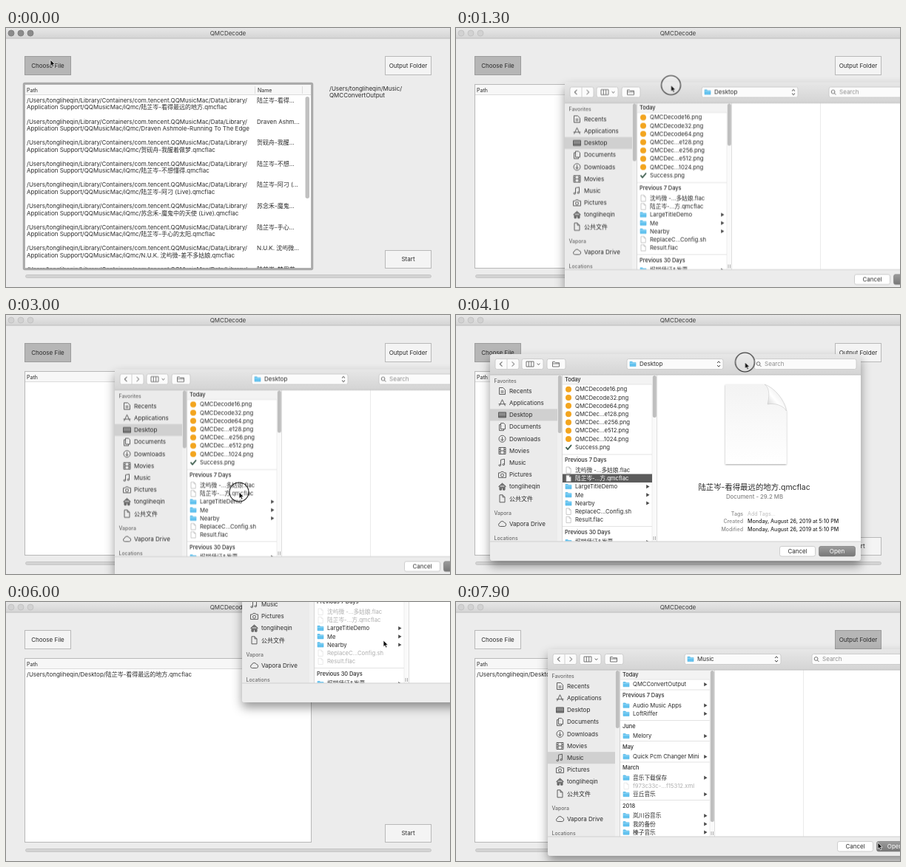
Write an HTML page that moves like this. It is 600 by 351 pixels and loops after 8 s.

```html
<!DOCTYPE html>
<html lang="en">
<head>
<meta charset="utf-8">
<title>QMCDecode</title>
<style>
html, body { margin: 0; width: 100%; height: 100%; overflow: hidden; background: #ececec; }
svg { display: block; width: 600px; height: 351px; }
text { font-family: Inter, "Noto Sans CJK SC", "Noto Sans CJK", sans-serif; white-space: pre; }
.dim { opacity: .38; filter: grayscale(1); }
</style>
</head>
<body>
<svg id="stage" viewBox="0 0 600 351" xmlns="http://www.w3.org/2000/svg"></svg>
<script>
const LOOP = 8000;
const USER = 'tongliheqin';
const SONG = '陆芷岑-看得最远的地方.qmcflac';

// ---- drawing helpers (text y is the middle of the line) ----
const text = (x, y, s, o = {}) =>
  `<text x="${x}" y="${y + (o.size || 8) * 0.36}" font-size="${o.size || 8}" fill="${o.fill || '#2b2b2b'}"` +
  ` font-weight="${o.weight || 400}" text-anchor="${o.anchor || 'start'}">${s.replace(/&/g, '&amp;')}</text>`;
const rect = (x, y, w, h, fill, extra = '') =>
  `<rect x="${x}" y="${y}" width="${w}" height="${h}" fill="${fill}" ${extra}/>`;
const line = (x1, y1, x2, y2, color = '#dcdcdc') =>
  `<path d="M${x1} ${y1}L${x2} ${y2}" stroke="${color}" fill="none"/>`;
const stroke = (x, y, d, color = '#555', w = 1, fill = 'none') =>
  `<path transform="translate(${x} ${y})" d="${d}" stroke="${color}" stroke-width="${w}" fill="${fill}" stroke-linejoin="round"/>`;
const group = (id, body) => `<g id="${id}">${body}</g>`;
const gradient = (id, a, b) =>
  `<linearGradient id="${id}" x2="0" y2="1"><stop stop-color="${a}"/><stop offset="1" stop-color="${b}"/></linearGradient>`;

const defs = `<defs>
  ${gradient('bar', '#e7e7e7', '#d4d4d4')}${gradient('accent', '#9c9c9c', '#777')}${gradient('paper', '#f3f3f3', '#fff')}
  <linearGradient id="curl" x1="0" y1="1" x2="1" y2="0"><stop stop-color="#bdbdbd"/><stop offset=".45" stop-color="#fff"/><stop offset="1" stop-color="#d9d9d9"/></linearGradient>
  <clipPath id="tableClip"><rect x="26" y="77" width="386" height="248.5"/></clipPath>
  <clipPath id="listClip"><rect y="28" width="501" height="226"/></clipPath>
  <filter id="shadow" x="-10%" y="-15%" width="120%" height="135%"><feDropShadow dx="0" dy="7" stdDeviation="7" flood-opacity=".4"/></filter>
  <filter id="soft" x="-10%" y="-10%" width="120%" height="120%"><feDropShadow dx="0" dy="1" stdDeviation="1.2" flood-opacity=".35"/></filter>
</defs>`;

// ---- main window ----
const pushButton = (x, y, h, label, down) =>
  rect(x + .5, y + .5, 62, h, down ? '#b6b6b6' : '#f4f4f4', `stroke="${down ? '#9c9c9c' : '#b9b9b9'}"`) +
  text(x + 31.5, y + h / 2 + .5, label, { anchor: 'middle' });
const lights = (fill, edge) => [7, 20, 33].map(x =>
  `<circle cx="${x}" cy="7" r="4" fill="${fill}" stroke="${edge}" stroke-width=".7"/>`).join('');

const LIBRARY = `/Users/${USER}/Library/Containers/com.tencent.QQMusicMac/Data/Library/`;
const SUPPORT = 'Application Support/QQMusicMac/iQmc/';
const songs = [
  [SONG, '陆芷岑-看得...'],
  ['Draven Ashmole-Running To The Edge', 'Draven Ashm...'],
  ['贺砚舟-我醒着做梦.qmcflac', '贺砚舟-我醒...'],
  ['陆芷岑-不想懂得.qmcflac', '陆芷岑-不想...'],
  ['陆芷岑-阿刁 (Live).qmcflac', '陆芷岑-阿刁 (...'],
  ['苏念禾-魔鬼中的天使 (Live).qmcflac', '苏念禾-魔鬼...'],
  ['陆芷岑-手心的太阳.qmcflac', '陆芷岑-手心...'],
  ['N.U.K. 沈屿微-差不多姑娘.qmcflac', 'N.U.K. 沈屿微...'],
  ['陆芷岑-梦里花.qmcflac', '陆芷岑-梦里花...']
];
const songRows = songs.map(([file, name], i) => {
  const y = 98 + i * 28.65;
  return text(28, y, LIBRARY) + text(28, y + 9.5, SUPPORT + file) + text(339, y, name);
}).join('');

const mainWindow =
  rect(0, 0, 600, 351, '#ececec') + rect(0, 0, 600, 14, 'url(#bar)') + line(0, 14, 600, 14, '#bdbdbd') +
  lights('#d2d2d2', '#bcbcbc') + group('active', lights('#8b8b8b', '#777')) +
  text(300, 7, 'QMCDecode', { anchor: 'middle', fill: '#3c3c3c' }) +
  pushButton(25, 38, 25, 'Choose File') + group('chooseDown', pushButton(25, 38, 25, 'Choose File', true)) +
  pushButton(512, 38, 25, 'Output Folder') + group('outputDown', pushButton(512, 38, 25, 'Output Folder', true)) +
  text(437, 82, `/Users/${USER}/Music/`) + text(437, 91.5, 'QMCConvertOutput') +
  pushButton(512, 301, 24, 'Start') +
  rect(25.5, 76.5, 387, 249, '#fff', 'stroke="#b8b8b8"') +
  rect(26, 77, 386, 13, '#f7f7f7') + line(26, 90.5, 412, 90.5) + line(336.5, 79, 336.5, 89) + line(400.5, 79, 400.5, 89) +
  text(28, 84, 'Path', { size: 7 }) + text(340, 84, 'Name', { size: 7 }) +
  group('library', rect(24, 75, 390, 252, 'none', 'stroke="#a9a9a9" stroke-width="2.5" rx="1.5"') +
    `<g clip-path="url(#tableClip)">${songRows}</g>` + rect(404.5, 93, 5.5, 138, '#c1c1c1', 'rx="2.7"')) +
  group('picked', text(28, 98, `/Users/${USER}/Desktop/${SONG}`) + text(339, 98, '陆芷岑-看得...')) +
  rect(26.5, 334.5, 548, 4, '#d3d3d3', 'rx="2" stroke="#c2c2c2" stroke-width=".8"');

// ---- file panel ----
const places = [
  ['Recents', 'M-4-4.5h5l3 3v6h-8zM-2 0h4M-2 2h4'],
  ['Applications', 'M-4 4L0-4.5L4 4M-5 1.5h10'],
  ['Desktop', 'M-5-3.5h10v7h-10zM-5 1.8h10', '#8b8b8b'],
  ['Documents', 'M-2-5h4l2 2v6h-6zM-2-3h-2v8h6v-2'],
  ['Downloads', 'M4.5 0a4.5 4.5 0 1 1-9 0a4.5 4.5 0 1 1 9 0M0-2.5v5M-2 .5L0 2.5L2 .5'],
  ['Movies', 'M-4.5-4.5h9v9h-9zM-2.5-4.5v9M2.5-4.5v9M-2.5 0h5M-4.5-1.5h2M-4.5 1.5h2M2.5-1.5h2M2.5 1.5h2'],
  ['Music', 'M-2 3.5V-4l5-1v7.5M-2 3.5a1.3 1 0 1 1-2.6 0a1.3 1 0 1 1 2.6 0M3 2.5a1.3 1 0 1 1-2.6 0a1.3 1 0 1 1 2.6 0'],
  ['Pictures', 'M-5-2.5h2.5l1-1.5h3l1 1.5h2.5v6.5h-10zM2 .7a2 2 0 1 1-4 0a2 2 0 1 1 4 0'],
  [USER, 'M-5 0L0-4.5L5 0M-3.5-1v5.5h2.5v-3h2v3h2.5v-5.5', '#777'],
  ['公共文件', 'M-3.5-5h4l3 3v7h-7zM.5-5v3h3']
];
const CLOUD = 'M-3 3.5a2.3 2.3 0 0 1-.3-4.5a3.3 3.3 0 0 1 6.2-.6a2.6 2.6 0 0 1 .3 5.1z';
const placeY = i => 50 + i * 16.2;
const placeMark = i => rect(0, placeY(i) - 8, 91, 16, '#d0d0d0');
const heading = (y, s) => text(5.5, y, s, { size: 6.9, weight: 500, fill: '#6c6c6c' });

const icons = {
  folder: (x, y) => stroke(x, y, 'M-4-3.3h3l1 1.2h4v5.2h-8z', '#4fb5e6', .6, '#62c2ef') + line(x - 4, y - 1.2, x + 4, y - 1.2, '#8fd6f6'),
  app: (x, y) => `<circle cx="${x}" cy="${y}" r="4" fill="#f3a51f"/>`,
  doc: (x, y) => stroke(x, y, 'M-3-4.2h4l2.2 2.2v6.2h-6.2zM1-4.2v2.2h2.2', '#b4b4b4', .7, '#fff'),
  check: (x, y) => stroke(x, y, 'M-3.5 0L-1 3L4-3', '#3f5f50', 1.7)
};

// sections: [heading y, title, [icon, name], ...]
const listing = (sections, dimFiles) => sections.map(([y, title, ...rows], n) =>
  (n ? line(98, y - 7.5, 219, y - 7.5, '#e3e3e3') : rect(98, 28, 121, 13, '#f3f3f3') + line(98, 41, 219, 41, '#e6e6e6')) +
  text(101, y, title, { size: 7.4, weight: 500 }) +
  rows.map(([icon, name], i) => {
    const ry = y + 13.7 + i * 11.2, isDir = icon === 'folder';
    return `<g class="${dimFiles && !isDir ? 'dim' : ''}">${icons[icon](106, ry)}${text(115, ry, name, { size: 7.7 })}</g>` +
      (isDir ? stroke(213, ry, 'M-1.8-2.6L2.5 0L-1.8 2.6z', 'none', 0, '#4a4a4a') : '');
  }).join('')).join('');

const SHORT = '陆芷岑-...方.qmcflac';
const desktopList = [
  [34, 'Today',
    ...['ode16', 'ode32', 'ode64', '...e128', '...e256', '...e512', '...1024'].map(s => ['app', `QMCDec${s}.png`]),
    ['check', 'Success.png']],
  [143.5, 'Previous 7 Days', ['doc', '沈屿微 -...多姑娘.flac'], ['doc', SHORT], ['folder', 'LargeTitleDemo'],
    ['folder', 'Me'], ['folder', 'Nearby'], ['doc', 'ReplaceC...Config.sh'], ['doc', 'Result.flac']],
  [241, 'Previous 30 Days', ['folder', '报销凭证&发票']]
];
const musicList = [
  [34, 'Today', ['folder', 'QMCConvertOutput']],
  [62.5, 'Previous 7 Days', ['folder', 'Audio Music Apps'], ['folder', 'LoftRiffer']],
  [104, 'June', ['folder', 'Melory']],
  [132, 'May', ['folder', 'Quick Pcm Changer Mini']],
  [160.5, 'March', ['folder', '音乐下载保存'], ['doc', 'f973c33c-...f15312.xml'], ['folder', '豆丘音乐']],
  [212, '2018', ['folder', '岚川谷音乐'], ['folder', '我的备份'], ['folder', '榛子音乐']]
];

const field = (x, w) => rect(x, 6.5, w, 14, '#fbfbfb', 'rx="2.5" stroke="#c6c6c6" stroke-width=".8"');
const toolbar =
  field(7, 32) + line(23, 7, 23, 20, '#d0d0d0') + stroke(15, 13.5, 'M1.5-3.2L-1.7 0L1.5 3.2', '#777', 1.1) +
  stroke(31, 13.5, 'M-1.5-3.2L1.7 0L-1.5 3.2', '#999', 1.1) +
  field(43, 29) + stroke(54, 13.5, 'M-5-3.5h10v7h-10zM-1.7-3.5v7M1.7-3.5v7', '#666', .9) +
  stroke(65.5, 13.5, 'M-1.8-.8L0 1L1.8-.8', '#555', 1) +
  field(77, 25) + stroke(89, 13.5, 'M-4.5-3h3l1 1.2h5v5.3h-9zM-4.5-.5h9', '#666', .9) +
  field(185, 130) + stroke(309, 13.5, 'M-2-1.5L0-3.7L2-1.5M-2 1.5L0 3.7L2 1.5', '#444', 1) +
  field(357, 138) + stroke(363, 13, 'M2 0a2.4 2.4 0 1 1-4.8 0a2.4 2.4 0 1 1 4.8 0M1.3 1.8L3.5 4', '#666', .9) +
  text(371, 13.5, 'Search', { fill: '#8e8e8e' });
const place = name => icons.folder(193, 13.5) + text(202, 13.5, name);

const panel = (id, states) => group(id,
  rect(0, 0, 501, 280, '#ececec', 'rx="4" filter="url(#shadow)"') +
  '<path d="M0 28V4a4 4 0 0 1 4-4H497a4 4 0 0 1 4 4V28z" fill="url(#bar)"/>' + toolbar +
  '<g clip-path="url(#listClip)">' +
  rect(0, 28, 98, 226, '#ebebeb') + rect(98, 28, 403, 226, '#fff') + states.map(s => s.mark).join('') +
  heading(36.5, 'Favorites') + heading(216, 'Vapora') + heading(249.5, 'Locations') +
  places.map(([name, d, fill], i) =>
    stroke(16.5, placeY(i), d, '#585858', .95, fill) + text(26, placeY(i), name)).join('') +
  stroke(16.5, 230, CLOUD, '#585858', .95) + text(26, 230, 'Vapora Drive') +
  rect(91, 28, 6.5, 226, '#f1f1f1') + rect(91.8, 29, 5, 78, '#bfbfbf', 'rx="2.5"') +
  line(97.5, 28, 97.5, 254, '#d6d6d6') + line(345.5, 28, 345.5, 254, '#ebebeb') +
  rect(219, 28, 6.5, 226, '#fafafa') + line(225.5, 28, 225.5, 254, '#dedede') + line(219, 28, 219, 254, '#ededed') +
  line(221, 247, 221, 252, '#aaa') + line(223.5, 247, 223.5, 252, '#aaa') +
  states.map(s => s.body).join('') + '</g>' +
  line(0, 28, 501, 28, '#bebebe') + line(0, 254, 501, 254, '#cfcfcf') + states.map(s => s.title).join('') +
  rect(391.5, 260.5, 48, 13.5, '#fff', 'rx="2.5" stroke="#c4c4c4" stroke-width=".8"') + text(415.5, 267, 'Cancel', { anchor: 'middle' }) +
  rect(444.5, 260.5, 49, 13.5, 'url(#accent)', 'rx="2.5" stroke="#757575" stroke-width=".6"') +
  text(469, 267, 'Open', { anchor: 'middle', fill: '#fff' }));

const thumb = height => rect(219.8, 29, 5, height, '#bfbfbf', 'rx="2.5"');
const info = (y, label, value, fill) =>
  text(342, y, label, { size: 7, fill: '#8a8a8a', anchor: 'end', weight: 500 }) + text(348, y, value, { size: 7.1, fill, weight: fill ? 400 : 500 });
const preview = rect(226, 28.5, 275, 225.5, '#fff') +
  '<path d="M318 41H371C384 47 397 62 400.5 77V149H318z" fill="url(#paper)" filter="url(#soft)"/>' +
  '<path d="M371 41C379 46 377 60 375 68C384 66 396 69 400.5 77C398 62 385 46 371 41z" fill="url(#curl)" stroke="#c9c9c9" stroke-width=".6"/>' +
  text(357, 180, SONG, { size: 10.4, anchor: 'middle' }) +
  text(357.5, 193, 'Document - 29.2 MB', { size: 7.8, anchor: 'middle', fill: '#858585', weight: 500 }) +
  info(216, 'Tags', 'Add Tags...', '#bcbcbc') +
  info(226.5, 'Created', 'Monday, August 26, 2019 at 5:10 PM') + info(237, 'Modified', 'Monday, August 26, 2019 at 5:10 PM');
const chosenRow = rect(98, 162.5, 121, 11.5, '#5c5c5c') + icons.doc(106, 168.4) + text(115, 168.4, SHORT, { size: 7.7, fill: '#fff' });

const filePanel = panel('filePanel', [{
  mark: placeMark(2), title: place('Desktop'),
  body: listing(desktopList) + thumb(57) + group('chosen', chosenRow) + group('preview', preview)
}]);
const folderPanel = panel('folderPanel', [{
  mark: group('markA', placeMark(2)), title: group('titleA', place('Desktop')),
  body: group('bodyA', listing(desktopList, true) + thumb(57))
}, {
  mark: group('markB', placeMark(6)), title: group('titleB', place('Music')),
  body: group('bodyB', listing(musicList, true) + thumb(205))
}]);

const pointer = group('pointer',
  group('press', '<circle r="13" fill="#fff" fill-opacity=".15" stroke="#222" stroke-width="1.1"/>') +
  '<path d="M0 0V8.6L2 6.9L3.4 10L5 9.3L3.6 6.3H6.2z" fill="#111" stroke="#fff" stroke-width=".7"/>');

document.getElementById('stage').innerHTML = defs + mainWindow + filePanel + folderPanel + pointer;

// ---- motion ----
const play = (id, frames) => {
  const last = frames[frames.length - 1];
  if (frames[0].offset > 0) frames.unshift({ ...frames[0], offset: 0 });
  if (last.offset < 1) frames.push({ ...last, offset: 1 });
  document.getElementById(id).animate(frames, { duration: LOOP, iterations: Infinity });
};
const move = (id, steps) => play(id, steps.map(([t, x, y]) =>
  ({ offset: t / LOOP, transform: `translate(${x}px, ${y}px)`, easing: 'ease-in-out' })));
const fade = (id, steps, easing = 'linear') => play(id, steps.map(([t, opacity]) => ({ offset: t / LOOP, opacity, easing })));
const show = (id, ...spans) => {
  const steps = spans.flatMap(([from, to]) => [[from, 1], [to, 0]]);
  if (spans[0][0] > 0) steps.unshift([0, 0]);
  fade(id, steps, 'step-end');
};

show('active', [0, 500], [4700, 5600]);
show('library', [0, 300]);
show('picked', [4700, LOOP]);
show('chooseDown', [0, 4600]);
show('outputDown', [5400, LOOP]);
show('chosen', [3100, LOOP]);
show('preview', [3300, LOOP]);
show('press', [1000, 1500], [2950, 3150], [3650, 4200], [4500, 4600], [5380, 5500], [6400, 7050], [7330, 7430]);
['markA', 'titleA', 'bodyA'].forEach(id => show(id, [0, 7400]));
['markB', 'titleB', 'bodyB'].forEach(id => show(id, [7400, LOOP]));

fade('filePanel', [[0, 0], [500, 0], [650, 1], [4600, 1], [4780, 0]]);
fade('folderPanel', [[0, 0], [5580, 0], [5720, 1]]);
move('filePanel', [[0, 319, -144], [1000, 319, -144], [1300, 147, 73.5], [3680, 147, 73.5], [4100, 46, 53]]);
move('folderPanel', [[0, 319, -144], [6430, 319, -144], [6900, 127, 67], [7000, 124, 64]]);
move('pointer', [
  [0, 60, 43], [400, 60, 43], [900, 462.5, -140], [1000, 462.5, -140], [1300, 290.5, 77.5], [1900, 290.5, 77.5],
  [2800, 315, 240], [3150, 315, 240], [3600, 491.5, 84.5], [3680, 491.5, 84.5], [4100, 390.5, 64], [4200, 390.5, 64],
  [4480, 515, 320], [4950, 515, 320], [5350, 543, 51], [5800, 543, 51], [6000, 510, 52], [6300, 446, -129],
  [6430, 446, -129], [6900, 254, 82], [7000, 251, 79], [7050, 251, 79], [7320, 160, 212], [7480, 160, 212], [7880, 570, 326]
]);
</script>
</body>
</html>
```
